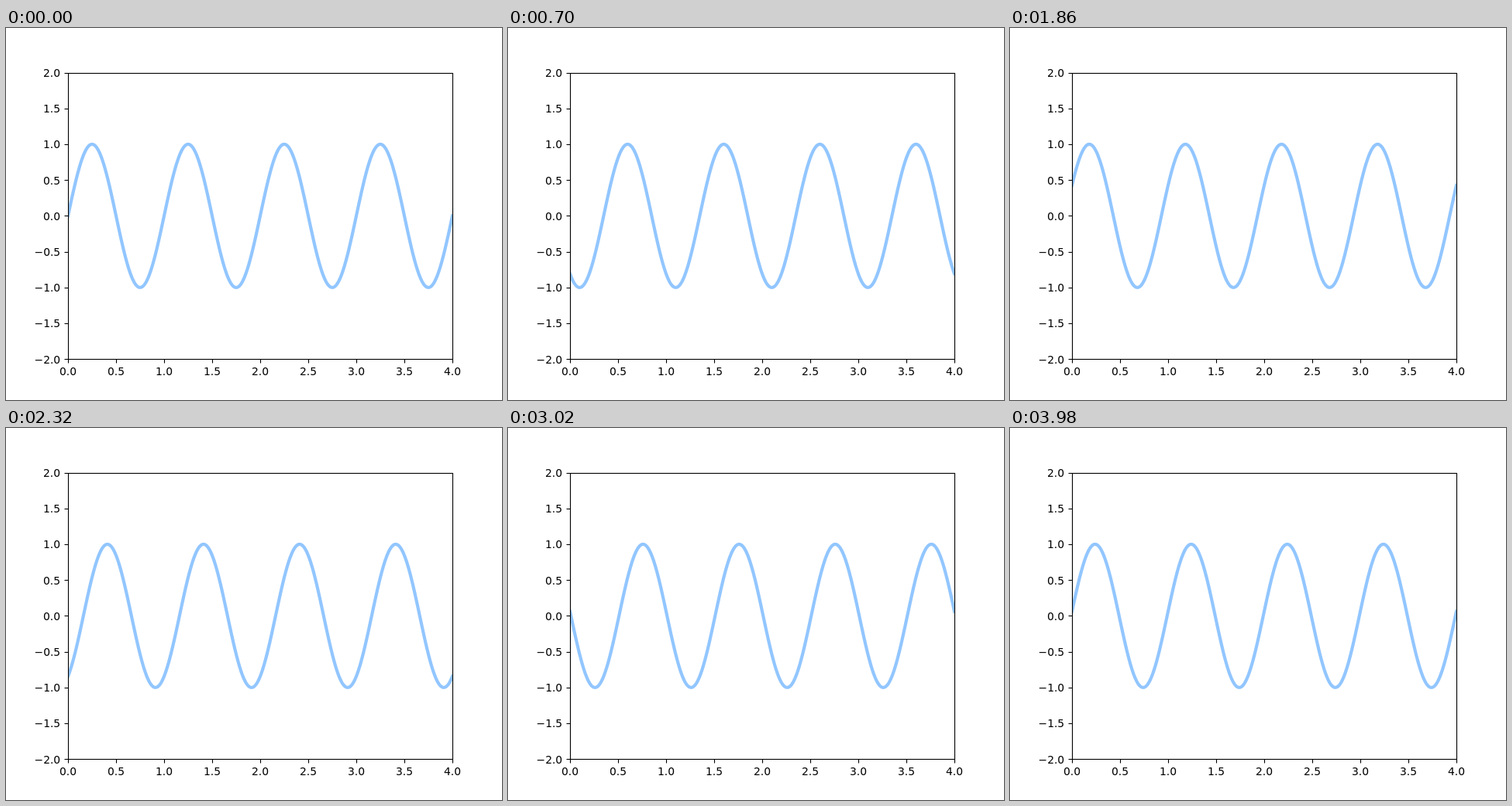
Write an HTML page with a canvas that moves like this. It is 640x480 px and loops after 4 s.

```html
<!DOCTYPE html>
<html lang="en">
<head>
<meta charset="utf-8">
<title>Travelling sine wave</title>
<style>
  html, body { margin: 0; width: 100%; height: 100%; overflow: hidden; background: #fff; }
  canvas { display: block; }
</style>
</head>
<body>
<canvas id="plot" width="640" height="480"></canvas>
<script>
const ctx = document.getElementById('plot').getContext('2d');

const LEFT = 80, RIGHT = 576, TOP = 57.6, BOTTOM = 427.2;
const LOOP = 4000, STEP = 20, SHIFT = 0.01;
const PT = 100 / 72;

const px = x => LEFT + x / 4 * (RIGHT - LEFT);
const py = y => (TOP + BOTTOM) / 2 - y / 4 * (BOTTOM - TOP);
const snap = v => Math.round(v) + 0.5;

function segment(x1, y1, x2, y2) {
  ctx.beginPath();
  ctx.moveTo(x1, y1);
  ctx.lineTo(x2, y2);
  ctx.stroke();
}

function drawWave(offset) {
  ctx.save();
  ctx.beginPath();
  ctx.rect(LEFT, 58, RIGHT - LEFT, 369);
  ctx.clip();
  ctx.strokeStyle = '#92c6ff';
  ctx.lineWidth = 3 * PT;
  ctx.lineCap = 'square';
  ctx.lineJoin = 'round';
  ctx.beginPath();
  for (let i = 0; i < 1000; i++) {
    const x = 4 * i / 999;
    ctx.lineTo(px(x), py(Math.sin(2 * Math.PI * (x - offset))));
  }
  ctx.stroke();
  ctx.restore();
}

function drawAxes() {
  ctx.strokeStyle = ctx.fillStyle = '#000';
  ctx.lineWidth = 0.8 * PT;
  ctx.font = 10 * PT + 'px "DejaVu Sans", sans-serif';
  ctx.textAlign = 'left';
  ctx.textBaseline = 'alphabetic';

  const l = snap(LEFT), r = snap(RIGHT), t = snap(TOP), b = snap(BOTTOM);
  ctx.strokeRect(l, t, r - l, b - t);

  for (let i = 0; i <= 8; i++) {
    const vx = i / 2, vy = i / 2 - 2;

    const x = snap(px(vx));
    segment(x, b, x, b + 5);
    ctx.fillText(vx.toFixed(1), Math.round(px(vx) - 11.04), 448);

    const y = snap(py(vy));
    segment(l - 5, y, l, y);
    const label = vy.toFixed(1).replace('-', '\u2212');
    const start = vy < 0 ? 36.5 : 48;
    ctx.fillText(label, start, Math.round(py(vy) + 5.35));
  }
}

function render(now) {
  const step = Math.floor((now % LOOP) / STEP);
  ctx.fillStyle = '#fff';
  ctx.fillRect(0, 0, 640, 480);
  drawWave(step * SHIFT);
  drawAxes();
}

let start = null;
function tick(now) {
  if (start === null) start = now;
  render(now - start);
  requestAnimationFrame(tick);
}
render(0);
requestAnimationFrame(tick);
</script>
</body>
</html>
```
